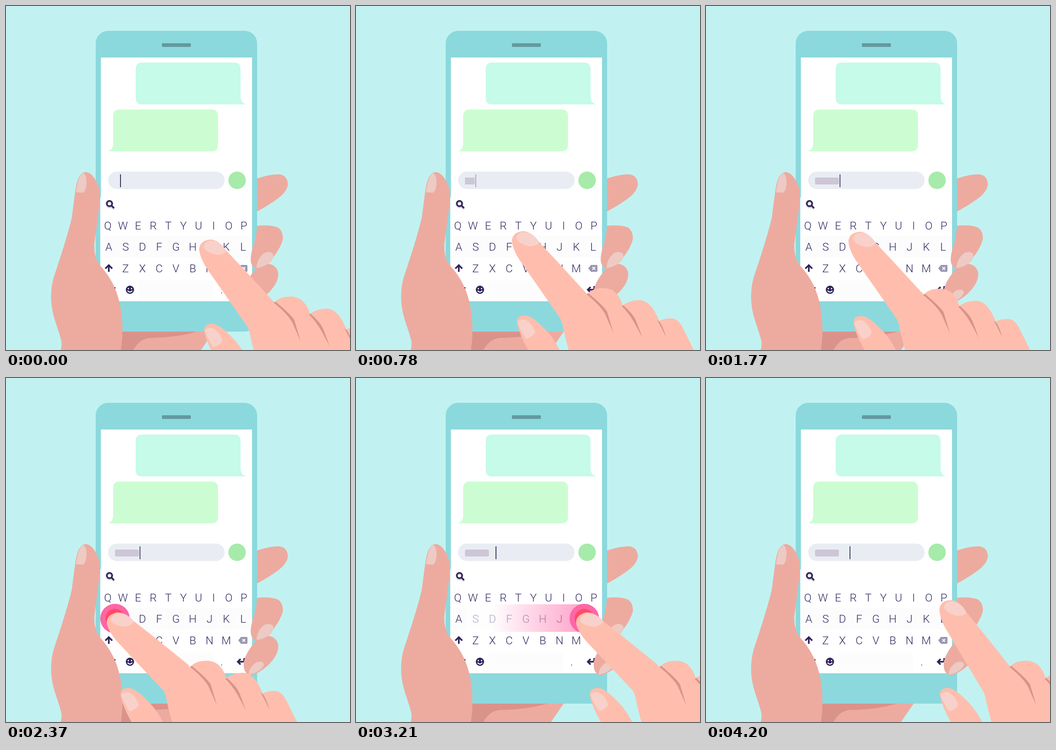
Write an HTML page that moves like this. It is 748 px wide and 748 px high and loops after 4500 ms.

```html
<!DOCTYPE html>
<html lang="en">
<head>
<meta charset="utf-8">
<style>
  html, body { margin: 0; width: 100%; height: 100%; overflow: hidden; background: #c1f2f1; }
  svg { display: block; width: 100%; height: 100%; }
  text { font: 300 24px Roboto, sans-serif; text-anchor: middle; fill: #312a60; }
  .skin { fill: #edaba0; }
  .shade { fill: #da938b; }
  .nail { fill: #edcac4; }
  .light { fill: #ffbead; }
  .lightNail { fill: #f8d1ca; }
  .line { fill: none; stroke: #30235c; stroke-width: 3.6; }
</style>
</head>
<body>
<svg viewBox="0 0 748 748">
  <defs>
    <linearGradient id="fade">
      <stop offset=".22" stop-color="#fff"/>
      <stop offset="1" stop-color="#ff66a6"/>
    </linearGradient>
    <path id="bubble" d="M0 14Q0 0 14 0H214Q228 0 228 14V76Q229 88 240 91H14Q0 91 0 77Z"/>
  </defs>

  <!-- holding hand, behind the phone -->
  <path class="skin" d="M540 377Q575 365 594 366Q612 368 613 388Q611 406 585 423Q565 437 540 450Z"/>
  <path class="shade" d="M240 700H420V712L300 748H240Z"/>
  <path class="skin" d="M277 748Q290 724 312 722Q372 721 416 708V700H457L424 748Z"/>

  <!-- phone -->
  <rect x="195" y="54" width="351" height="654" rx="27" fill="#8bd9dd"/>
  <rect x="339" y="81" width="63" height="8" rx="2" fill="#6499a0"/>
  <path fill="#fff" d="M206.400 112H535V642H205V416H206.400Z"/>
  <use href="#bubble" x="282" y="123" fill="#c5fbe8"/>
  <use href="#bubble" transform="translate(461 225) scale(-1 1)" fill="#ccfdd2"/>
  <rect x="222" y="360" width="253.500" height="38" rx="19" fill="#e9edf3"/>
  <circle cx="502.500" cy="379" r="19" fill="#a6eba9"/>
  <rect id="typed" x="237" y="373" height="15" fill="#cdc6d6"/>
  <rect id="cursor" y="366" width="1.800" height="28" fill="#2b2150"/>

  <!-- keyboard -->
  <rect x="206" y="500" width="329" height="47" fill="#fcfcfd"/>
  <rect x="288" y="597" width="162" height="41" fill="#fcfcfc"/>
  <g id="keys"></g>
  <g class="line" style="filter:drop-shadow(0 2px 1px #0004)">
    <circle cx="225" cy="429.500" r="5.800"/>
    <path d="M229 433.500L235 439.500"/>
  </g>
  <path class="line" d="M223.500 578V564M216 571L223.500 563.500L231 571"/>
  <path fill="#9a97b2" d="M505 570.500L511 563H523Q525 563 525 565V576Q525 578 523 578H511Z"/>
  <path d="M514 567.500L520 573.500M520 567.500L514 573.500" stroke="#fff" stroke-width="2"/>
  <circle cx="269.500" cy="617" r="9" fill="#30235c"/>
  <path d="M266 613V616M273 613V616M264.500 619Q269.500 625 274.500 619" fill="none" stroke="#fff" stroke-width="2.400"/>
  <path class="line" d="M518 609V614Q518 617 514 617H505M510 611L504 617L510 623"/>
  <path class="line" d="M231 613H238M234 617H237M231 621H238"/>

  <!-- touch feedback -->
  <rect id="trail" x="238" y="492" height="60" fill="url(#fade)"/>
  <circle id="outer" fill="#ff66a6"/>
  <circle id="inner" fill="#ff4b66"/>

  <!-- holding hand, in front of the phone -->
  <path class="skin" d="M548 565C578 552 592 570 592 583Q592 605 566 628Q546 645 530 646Q515 642 517 617Q521 600 535 582Z"/>
  <path class="nail" d="M528 645Q528 628 545 618Q560 614 561 624Q552 641 528 645Z"/>
  <path class="skin" d="M546 478Q575 475 592 482Q603 490 602 507Q598 525 580 548Q565 564 550 570Q533 571 532 552Q532 537 540 515Q545 495 546 478Z"/>
  <path class="nail" d="M545 570Q545 551 560 538Q572 531 581 539Q583 548 575 557Q560 568 545 570Z"/>
  <path class="skin" d="M150 407Q155 361 174 361Q191 363 203 397Q206 412 202 442Q197 480 192 518Q191 550 207 567Q240 604 249 655Q257 700 250 748H119Q122 738 120 727C114 700 98 672 98 632Q98 610 104 589Q134 500 143 460Z"/>
  <path class="nail" d="M152 405Q157 367 168 363Q176 368 175 387Q173 404 167 406Z"/>

  <!-- typing hand -->
  <g id="hand">
    <path class="light" d="M509 687Q509 674 527 674Q545 675 580 715Q592 730 601 748L640 850H575L533 748Q512 712 509 687Z"/>
    <path class="lightNail" d="M510 689Q514 683 524 683Q540 686 549 711Q545 719 529 725Q517 708 510 689Z"/>
    <path class="light" d="M602 678L607 690Q612 715 621 748L650 850H950L893 748L873 708Q863 685 850 681Q834 679 818 686Q802 644 778 641Q757 640 739 652Q728 618 702 615C685 614 672 617 662 627L640 650Z"/>
    <g id="finger">
      <path class="light" d="M508 502C510 490 518 483 535 483Q553 486 567 510L600 550L662 628L668 655L640 700L606 686L598 673L521 544Q508 520 508 502Z"/>
      <path class="lightNail" d="M518 500Q519 486 535 485Q556 488 567 510Q561 518 545 517Q525 511 518 500Z"/>
    </g>
    <g class="shade">
      <path d="M660 628L664 626Q697 653 705 666L719 713L701 672Q691 653 660 628Z"/>
      <path d="M737 654L740 652Q762 671 768 686L782 723L763 688Q752 669 737 654Z"/>
      <path d="M814 684L819 688Q826 697 833 721L823 701Z"/>
    </g>
  </g>
</svg>
<script>
const $ = id => document.getElementById(id);
const set = (id, attrs) => {
  for (const name in attrs) $(id).setAttribute(name, attrs[name]);
};
const clamp = v => Math.max(0, Math.min(1, v));
const mix = (a, b, u) => a + (b - a) * u;
// eased 0 to 1 between two times
const ramp = (t, from, to) => .5 - .5 * Math.cos(Math.PI * clamp((t - from) / (to - from)));

// letters, first centre, spacing
const rows = [['QWERTYUIOP', 221.5, 32.85], ['ASDFGHJKL', 223.5, 36.5], ['ZXCVBNM', 260, 36.5], ['.', 469, 0]];
$('keys').innerHTML = rows.map(([letters, x, step], row) =>
  [...letters].map((c, i) => `<text x="${x + i * step}" y="${485.5 + row * 46.5}">${c}</text>`).join('')).join('');

// spots on the keyboard where the hand pauses
const stops = [
  { arrive: 0, leave: 0, x: 419, y: 557 },
  { arrive: 460, leave: 545, x: 371, y: 478 },
  { arrive: 1020, leave: 1190, x: 304, y: 564 },
  { arrive: 1540, leave: 1560, x: 371, y: 523 },
  { arrive: 2000, leave: 2370, x: 237, y: 523 },
  { arrive: 3210, leave: 4500, x: 496.5, y: 523 }
];
const swipeEnd = 3240, restEnd = 4200;

// every stop between the first and the last is touched; the last touch is a swipe
const touches = stops.slice(1, -1).map(s => ({ ...s, down: s.leave - 150, up: s.leave, lift: 220 }));
const swipe = touches.at(-1);
Object.assign(swipe, { up: swipeEnd, lift: restEnd - swipeEnd });

function spot(t) {
  const i = stops.findLastIndex(s => t >= s.arrive);
  const a = stops[i], b = stops[i + 1] || a;
  const u = ramp(t, a.leave, b.arrive);
  return { x: mix(a.x, b.x, u), y: mix(a.y, b.y, u) };
}

function draw(t) {
  // the finger's reach covers half of the vertical distance
  const { x, y } = spot(t);
  set('hand', { transform: `translate(${x - 497} ${(y - 523) / 2})` });
  const press = Math.max(...touches.map(p =>
    ramp(t, p.down - 150, p.down) * (1 - ramp(t, p.up, p.up + p.lift))));
  const rest = .32 * (1 - ramp(t, swipeEnd, restEnd));
  set('finger', { transform: `rotate(${-12.5 * (rest + .68 * press)} 640 650)` });

  const width = 21 * ramp(t, 540, 780) + 15.5 * ramp(t, 780, 1260) + 15.5 * ramp(t, 1260, 1740);
  const spaces = 13 * ramp(t, 2760, 3180) + 8.7 * ramp(t, 3300, 3720);
  set('typed', { width, rx: 3 * clamp((width - 20) / 15) });
  set('cursor', {
    x: 237 + Math.max(11, width + 1.5) + spaces,
    opacity: clamp(.55 + .55 * Math.cos(t / 460 * 2 * Math.PI))
  });

  const touch = touches.findLast(p => t >= p.down) || touches[0];
  const swiping = touch === swipe;
  const cx = swiping ? x : touch.x, cy = touch.y;
  const grow = ramp(t, touch.down, touch.down + 100);
  const fade = 1 - clamp((t - touch.up) / 90);
  set('outer', { cx, cy, r: 32 * grow, opacity: fade });
  set('inner', { cx, cy, r: 21 * grow, opacity: clamp(fade * 2 - 1) });
  set('trail', {
    width: swiping ? Math.max(0, cx - 238) : 0,
    opacity: .6 * (1 - ramp(t, swipeEnd, swipeEnd + 260))
  });
}

function tick(now) {
  draw(Math.min(restEnd, Math.floor(now % 4500 / 30) * 30));
  requestAnimationFrame(tick);
}
draw(0);
requestAnimationFrame(tick);
</script>
</body>
</html>
```
